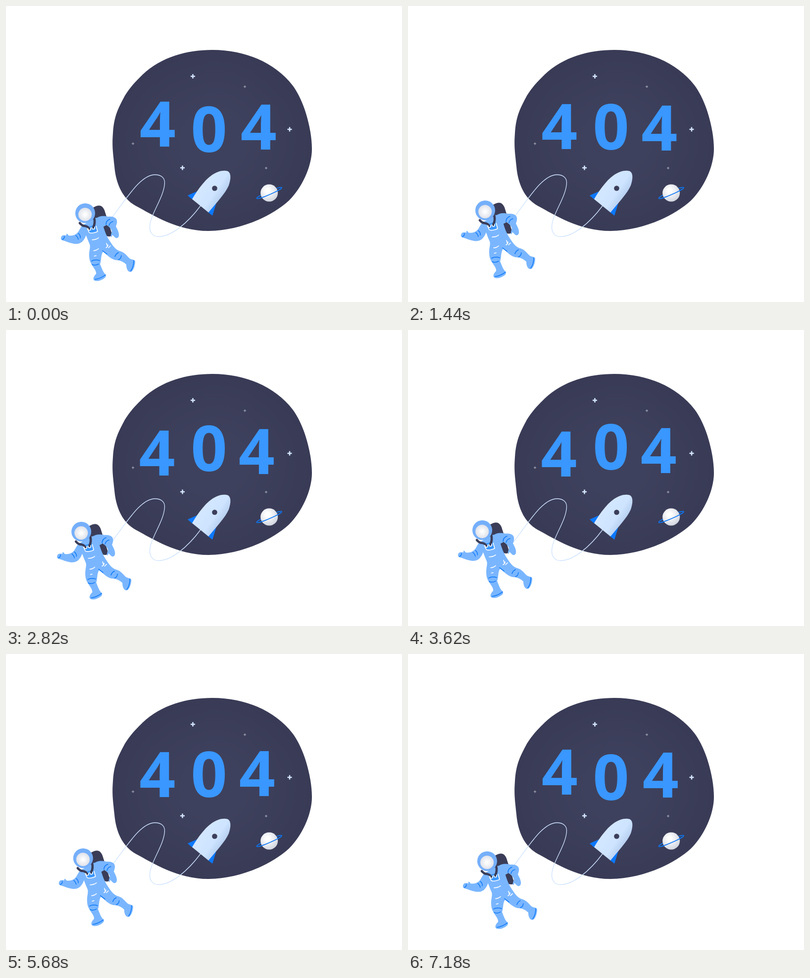
Recreate the animation shown at these times as an HTML page. Size 800 px wide and 600 px high, loop 7200 ms.

```html
<!DOCTYPE html>
<html lang="en">
<head>
<meta charset="utf-8">
<title>404</title>
<style>
  html, body { margin: 0; width: 100%; height: 100%; overflow: hidden; background: #fff; }
  svg { display: block; width: 800px; height: 600px; }
  text { font: 700 128px "Open Sans", "Noto Sans", sans-serif; fill: #3997ff; }
  .line { fill: none; stroke-linecap: round; stroke-linejoin: round; }
  .suit { fill: #7ab6ff; }
  .blue { stroke: #0b78f8; stroke-width: 1.5; }
  .white { stroke: #fff; stroke-width: 1.6; }
  .strap { stroke: #3b3d58; stroke-width: 4.6; }
</style>
</head>
<body>
<svg viewBox="0 0 800 600">
  <defs>
    <radialGradient id="space">
      <stop offset=".3" stop-color="#3e415d"/>
      <stop offset="1" stop-color="#393b56"/>
    </radialGradient>
    <radialGradient id="ball" cx=".4" cy=".36" r=".68">
      <stop offset=".15" stop-color="#fff"/>
      <stop offset="1" stop-color="#d0d4de"/>
    </radialGradient>
    <radialGradient id="glass">
      <stop offset=".1" stop-color="#fff"/>
      <stop offset="1" stop-color="#dfe2ea"/>
    </radialGradient>
    <linearGradient id="hull" gradientUnits="userSpaceOnUse" x1="398" y1="360" x2="442" y2="390">
      <stop offset="0" stop-color="#d3e7ff"/>
      <stop offset=".55" stop-color="#cee4ff"/>
      <stop offset="1" stop-color="#b0c9eb"/>
    </linearGradient>
  </defs>

  <path fill="url(#space)" d="M417 89C482 89 543 114 579 161C603 193 618 250 618 290C618 325 598 368 572 394C535 428 470 456 409 456C345 456 296 423 262 405C235 390 222 360 219 325C216 295 214 285 216 258C218 222 228 205 240 182C252 162 266 149 276 139C314 103 366 89 417 89Z"/>

  <path stroke="#d5e7ff" stroke-width="2.5" d="M373 142.5h9m-4.5-4.5v9M568.5 250h9m-4.5-4.5v9M352 328h9m-4.5-4.5v9"/>
  <path stroke="#9a9cae" stroke-width="1.3" d="M480 163.5h5m-2.5-2.5v5M254 279h5m-2.5-2.5v5M523 328.5h5m-2.5-2.5v5"/>

  <text id="left" x="269.8" y="284.9">4</text>
  <text id="zero" x="373.4" y="295.9">0</text>
  <text id="right" x="473.8" y="290.6">4</text>

  <path class="line" stroke="#cfe3ff" stroke-width="1.3" d="M213 430C247 385 273 342 301 342C313 342 320.500 348 320.500 358C320 387 290.500 423 290.500 448C290.500 461 298 467.500 308 467.500C334 467.500 367 440 393 405"/>

  <!-- rocket -->
  <path fill="#0b78ff" d="M367 384L392 373L376 392ZM425 399L417 425L407 417Z"/>
  <path fill="url(#hull)" d="M376 391.500C388 371 403 352 413 345C427 334 440 332.500 447 334.500C455 337 455 350 450 364C443 380 426 398 409 418.500Z"/>
  <circle cx="421.500" cy="369.500" r="5.300" fill="#3c3e5a"/>

  <!-- ringed planet -->
  <g transform="translate(531.7 379) rotate(-23.5)">
    <ellipse class="line blue" rx="27.500" ry="3.300"/>
    <circle r="17.500" fill="url(#ball)" transform="rotate(23.500)"/>
    <path class="line blue" d="M-27.500 0A27.500 3.300 0 0 0 27.500 0"/>
  </g>

  <g id="astronaut">
    <path fill="#3b3d58" d="M174 410Q185 403 191 405Q196 407 199 414L213.500 460Q215 466 210 467Q204 468 198 464L168 440Z"/>
    <!-- torso and legs -->
    <path class="suit" d="M152 446C160 456 163 470 169 483C171 488 168 496 168 503C168 512 169 518 173 524C177 531 183 537 182 543C177 548 175 553 178 556C182 559 191 557 197 553C202 550 203 547 201 544C196 540 193 530 190 523C193 516 191 506 196 498C204 504 210 512 221 515C231 515 238 519 243 524C243 532 246 539 251 539C257 539 261 526 261 518C260 513 253 515 249 511C243 505 240 500 231 497C222 495 216 486 210 477C203 466 199 456 196 444L182 429Z"/>
    <!-- arms -->
    <path class="suit" d="M158 443C149 447 149 456 143 461C137 466 131 466 126 465C125 463 124 461 122 462L122 465C118 464 114 464 112 467C110 471 111 474 114 475C122 477 130 481 138 482C147 483 153 480 157 474C161 469 163 462 164 454Z"/>
    <path class="suit" d="M179 433C188 424 199 425 207 427C216 426 223 429 224 435C225 439 223 443 222 447C226 454 229 461 228 466C227 471 222 472 219 468L215 464L213 469C211 466 212 463 214 457C213 452 209 448 203 444C198 447 194 449 188 449Z"/>
    <path fill="#3d98ff" d="M164 448L181 443L185 456Q178 460 169 460Z"/>
    <path class="line white" d="M164 450L168 459Q170 461 176 460T185 457L182 446M174 474Q182 474 187 470M177 496Q182 496 187 492M178.500 507L182 506M203 481L204.500 486M202 490Q206 488 206 484M207 490L211 486"/>
    <path class="line strap" d="M149 440Q154 446 160 446Q166 447 168 452M178 429Q181 440 176 449"/>
    <path class="line white" d="M165.500 451Q166 455 169 454.500T171 450M173.500 449Q174 453 177 452.500T179 448"/>
    <path class="line blue" d="M173 517Q180 513 189 516M174 524Q180 527 187 523M220 508Q222 502 227 500M227 514Q232 513 233 506M195 496L204 503M180 554Q190 553 201 545M252 537Q258 529 258 516M141 465Q145 468 146 473M146 461Q151 465 150 470M114 473Q118 472 118 467M202 443Q202 435 210 432M208 445Q210 438 216 437"/>
    <circle cx="160" cy="420" r="20" fill="#75affa"/>
    <circle cx="159.700" cy="422.500" r="13.600" fill="url(#glass)"/>
  </g>
</svg>
<script>
  const LOOP = 7200;
  // time, x, y of the right digit's small drift
  const drift = [[0, 0, 0], [800, -1, 1.9], [2060, -4, 3.4], [3620, -4, -.5],
                 [4500, -4.4, -2.2], [5680, -3, -2.5], [LOOP, 0, 0]];

  const move = (id, x, y) =>
    document.getElementById(id).setAttribute('transform', `translate(${x} ${y})`);

  function along(points, t) {
    const i = points.findIndex(p => p[0] > t);
    const [t0, x0, y0] = points[i - 1], [t1, x1, y1] = points[i];
    const k = (t - t0) / (t1 - t0);
    return [x0 + (x1 - x0) * k, y0 + (y1 - y0) * k];
  }

  const start = performance.now();
  function draw() {
    const t = (performance.now() - start) % LOOP;
    const sway = 1 - Math.abs(1 - t / (LOOP / 2));
    move('left', -1.5 * sway, 12.5 * sway);
    move('zero', 0, -13 * sway);
    move('right', ...along(drift, t));
    move('astronaut', -10 * sway, -14.3 * sway);
    requestAnimationFrame(draw);
  }
  draw();
</script>
</body>
</html>
```
